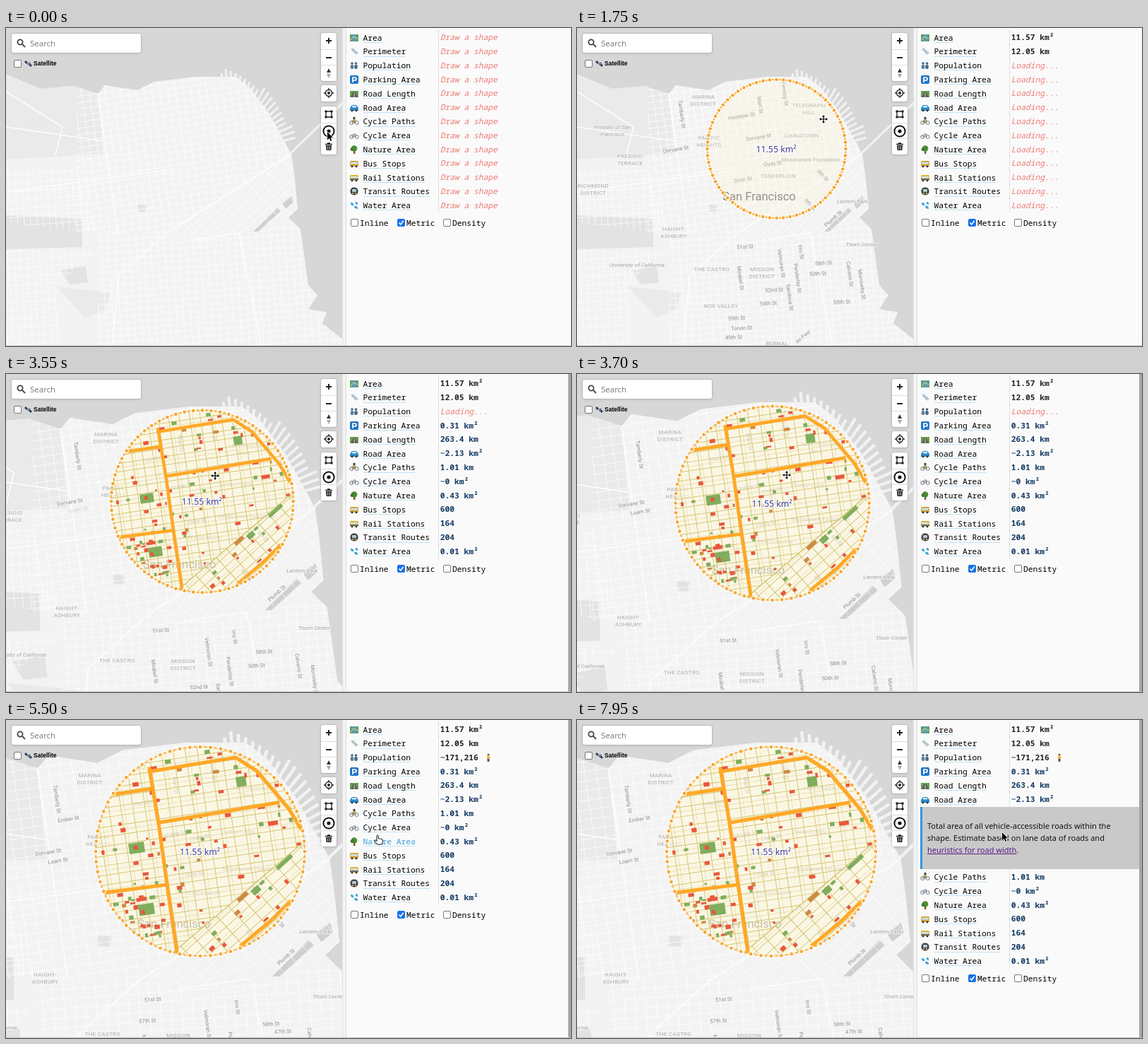
These frames come from a looping animation (800 px wide and 450 px high, 8 s). An HTML page with a canvas:

```html
<!DOCTYPE html>
<html lang="en">
<head>
<meta charset="utf-8">
<title>Area statistics</title>
<style>
html, body { margin: 0; width: 100%; height: 100%; overflow: hidden; background: #fafafa; }
#stage { position: relative; width: 800px; height: 450px; overflow: hidden; }
#map, #overlay { position: absolute; left: 0; top: 0; }
.card { position: absolute; background: #fff; border-radius: 3px; box-shadow: 0 0 0 1px rgba(0,0,0,.08), 0 1px 4px rgba(0,0,0,.14); }
#search { left: 8px; top: 8px; width: 183px; height: 27px; font: 11.5px/27px "Open Sans", sans-serif; color: #777; text-indent: 26px; }
#search svg { position: absolute; left: 7px; top: 7px; }
#sat { position: absolute; left: 11px; top: 45px; font: bold 8.5px/11px "Liberation Sans", sans-serif; color: #000; }
#sat span { position: absolute; left: 28px; }
#sat svg { position: absolute; left: 15px; top: 0; }
.box { position: absolute; width: 9px; height: 9px; border: 1px solid #777; border-radius: 2px; background: #fff; }
.box.on { background: #1a73e8; border-color: #1a73e8; }
.box svg { position: absolute; left: 0; top: 0; }
#panel { position: absolute; left: 476px; top: 0; width: 324px; height: 450px; background: #fafafa; border-left: 1px solid #e4e4e4; box-sizing: border-box; font: 500 11.28px/19.8px "Noto Sans Mono", monospace; color: #000; white-space: pre; }
#panel::before { content: ""; position: absolute; left: 0; top: 0; width: 4px; height: 450px; background: #f3f3f3; border-right: 1px solid #dcdcdc; }
#rows { position: absolute; left: 0; top: 3.7px; width: 320px; }
.row { position: relative; height: 19.8px; }
.row svg { position: absolute; left: 9px; top: 3px; }
.name { position: absolute; left: 28.5px; top: 0; height: 16.2px; border-bottom: 1px solid #c3e3f3; }
.row.hover .name { color: #3e9fe0; }
.value { position: absolute; left: 135px; top: -.5px; padding-left: 1.7px; border-left: 1px dotted #c8c8c8; font-weight: 600; color: #262626; }
.value.blue { color: #143a62; }
.value.wait { color: #ee7b75; font-style: italic; font-weight: 400; }
.value svg { left: 67px; top: 3px; }
.more { position: relative; overflow: hidden; height: 0; }
.more div { position: absolute; left: 9px; top: 1px; width: 310px; height: 87.5px; box-sizing: border-box; background: #c9c9c9; border-left: 3px solid #2f97e6; padding: 18px 0 0 7px; font: 400 11px/17px "Noto Sans", sans-serif; color: #111; }
.more u { color: #5a1c8c; }
#checks { position: relative; height: 20px; top: 5px; }
#checks .box { top: 4px; }
#checks span { position: absolute; }
#edge { position: absolute; right: 0; top: 0; width: 4px; height: 450px; background: #a6a6a6; }
#foot { position: absolute; left: 0; bottom: 0; width: 800px; height: 1px; background: #c4c4c4; }
</style>
</head>
<body>
<div id="stage">
  <canvas id="map" width="476" height="450"></canvas>
  <div id="search" class="card"><svg width="13" height="13" fill="none" stroke="#444" stroke-width="1.8"><circle cx="5" cy="5" r="3.6"/><path d="M7.7 7.7L12 12"/></svg>Search</div>
  <div id="sat"><i class="box"></i><svg width="12" height="11"><path d="M1 2l3 3M7 6l3 3" stroke="#27456b" stroke-width="3"/><path d="M4 6l3-3 2 2-3 3z" fill="#777"/></svg><span>Satellite</span></div>
  <div id="tools"></div>
  <div id="panel"><div id="rows"></div></div>
  <div id="edge"></div>
  <div id="foot"></div>
  <canvas id="overlay" width="800" height="450"></canvas>
</div>
<script>
const $ = id => document.getElementById(id);
const LOOP = 8000, FOCUS = [297.2, 141.6], ZOOM = 1.51;
const CENTER = [282.5, 171], RADIUS = 98;

// ---------- timing ----------
const ramp = (t, a, b) => Math.min(1, Math.max(0, (t - a) / (b - a)));
const ease = p => p * p * (3 - 2 * p);
const zoomAt = t => 1 + (ZOOM - 1) * (1 - (1 - ramp(t, 3200, 4250)) ** 2.37);
const radiusAt = t => RADIUS * ease(ramp(t, 850, 1400));

// start, end, x, y
const moves = [
  [50, 200, 394, 160], [350, 750, 283, 171], [850, 1400, 366, 119], [1500, 1750, 349, 129],
  [2650, 2900, 293, 148], [3200, 3700, 297, 143], [5000, 5500, 525, 163], [5850, 6200, 545, 172],
  [6450, 6750, 547, 125], [6900, 7150, 540, 107], [7300, 7700, 600, 150], [7750, 7950, 602, 159]
];
function cursorAt(t) {
  let x = 455, y = 147;
  for (const [a, b, toX, toY] of moves) {
    const p = ease(ramp(t, a, b));
    x += (toX - x) * p;
    y += (toY - y) * p;
  }
  const kind = t < 60 ? 'arrow' : t < 1450 ? 'cross' : x < 480 ? 'move' : x > 500 && x < 585 ? 'hand' : 'arrow';
  return { x, y, kind };
}

// ---------- panel ----------
const svg = (w, body) => `<svg width="${w}" height="14">${body}</svg>`;
const rect = (x, y, w, h, c, r = 0) => `<rect x="${x}" y="${y}" width="${w}" height="${h}" rx="${r}" fill="${c}"/>`;
const dot = (x, y, r, c) => `<circle cx="${x}" cy="${y}" r="${r}" fill="${c}"/>`;
const hoop = (x, y, r, c, w = 1) => `<circle cx="${x}" cy="${y}" r="${r}" fill="none" stroke="${c}" stroke-width="${w}"/>`;
const line = (d, c, w = 1) => `<path d="${d}" fill="none" stroke="${c}" stroke-width="${w}"/>`;
const shape = (d, c) => `<path d="${d}" fill="${c}"/>`;
const wheels = dot(4, 11, 1.4, '#333') + dot(10, 11, 1.4, '#333');
const bus = c => rect(1, 3, 12, 8, c, 1.5) + rect(2, 5, 10, 2.5, '#cfe6f2') + wheels;
const bike = line('M3.5 9L6 5L10 9M6 5H9L6.5 9H3.5', '#7b8c98') + hoop(3.2, 9, 2.5, '#6c7680') + hoop(10.6, 9, 2.5, '#6c7680');
const person = (x, c) => dot(x, 4, 1.8, '#48677f') + rect(x - 2.3, 6, 4.6, 6, c, 2);

const rowData = [
  ['Area', '11.57 km²', rect(1, 2, 12, 10, '#5fa06a') + rect(5, 2, 4, 10, '#5b9bc4') + line('M2 10L6 5L12 8', '#e9d9a0')],
  ['Perimeter', '12.05 km', shape('M2 4l3-2 8 7-3 3z', '#b9cbd6') + line('M4 6l1-1M6 8l1-1M8 10l1-1', '#7c8d98')],
  ['Population', '~171,216', person(4, '#5d7f98') + person(9.5, '#486c87')],
  ['Parking Area', '0.31 km²', rect(1, 1, 12, 12, '#1f76c9', 2) + line('M5 11V4H8A2 2 0 0 1 8 8H5', '#fff', 1.7)],
  ['Road Length', '263.4 km', rect(1, 3, 12, 9, '#6aa14c') + shape('M5 5h4l3 7H2z', '#56606a') + line('M7 6V12', '#f4d35e')],
  ['Road Area', '~2.13 km²', shape('M1 7l3-4h6l3 4v4H1z', '#2c8bc9') + rect(4, 4, 6, 2.5, '#cdeaf6') + wheels],
  ['Cycle Paths', '1.01 km', bike + dot(7, 2.4, 1.7, '#3a3a3a') + line('M7 4L5 7L8 9', '#b48a2c', 2)],
  ['Cycle Area', '~0 km²', bike],
  ['Nature Area', '0.43 km²', rect(6, 8, 2.4, 5, '#7c5633') + dot(7, 5.5, 4.3, '#4b8d35') + dot(4.3, 6.5, 2.6, '#3f7c2d')],
  ['Bus Stops', '600', bus('#d6a443')],
  ['Rail Stations', '164', bus('#e0b437') + line('M1 9H13', '#6d6d6d', 2)],
  ['Transit Routes', '204', rect(1.5, 1.5, 11, 11, '#444', 5) + rect(4, 4, 6, 4, '#b5c9d4', 1) + dot(5, 10, 1, '#f0d77c') + dot(9, 10, 1, '#f0d77c')],
  ['Water Area', '0.01 km²', shape('M2 3q5 0 4 4q-4 1-4-4M7 8q5-1 5 4q-5 0-5-4M9 2q4 0 3 4q-4 0-3-4', '#3ba4dc')]
];
const stories = {
  5: 'Total area of all vehicle-accessible roads within the\nshape. Estimate based on lane data of roads and\n<u>heuristics for road width</u>.',
  8: 'Total area of all natural spaces within the shape.\nIncludes parks, gardens, woods and other\ngreen areas.'
};
const rows = rowData.map(([name, value, icon], i) => {
  const el = document.createElement('div');
  el.className = 'row';
  el.innerHTML = svg(14, icon) + `<span class="name">${name}</span><span class="value"></span>`;
  $('rows').append(el);
  const row = { el, value, cell: el.lastChild };
  if (stories[i]) {
    row.more = document.createElement('div');
    row.more.className = 'more';
    row.more.innerHTML = `<div>${stories[i]}</div>`;
    $('rows').append(row.more);
  }
  return row;
});
const walker = svg(8, dot(3, 3, 1.6, '#8a5a35') + rect(1, 5, 4, 4.5, '#f0b429', 1) + rect(1.5, 9, 3, 4, '#4d5a70'));
const checkbox = (name, x, on) =>
  `<i class="box${on ? ' on' : ''}" style="left:${x}px">${on ? svg(10, line('M1.5 4.5L3.7 7L7.7 1.7', '#fff', 1.5)) : ''}</i><span style="left:${x + 13}px">${name}</span>`;
$('rows').insertAdjacentHTML('beforeend',
  `<div id="checks">${checkbox('Inline', 11)}${checkbox('Metric', 77, true)}${checkbox('Density', 142)}</div>`);

function setCell(row, text, kind) {
  const key = text + kind;
  if (row.key === key) return;
  row.key = key;
  row.cell.className = 'value ' + kind;
  row.cell.innerHTML = text;
}
function drawPanel(t, cursor) {
  const hover = cursor.kind === 'hand' ? Math.floor((cursor.y - 4) / 19.8) : -1;
  rows.forEach((row, i) => {
    const ready = i < 2 ? 1450 : i === 2 ? 5050 : 2150;
    if (t < 1450) setCell(row, 'Draw a shape', 'wait');
    else if (t < ready) setCell(row, 'Loading...', 'wait');
    else setCell(row, row.value + (i === 2 ? walker : ''), i > 2 ? 'blue' : '');
    row.el.classList.toggle('hover', i === hover);
  });
  rows[8].more.style.height = 90 * (ramp(t, 5870, 5970) - ramp(t, 6450, 6550)) + 'px';
  rows[5].more.style.height = 90 * ramp(t, 7150, 7300) + 'px';
  $('edge').style.opacity = ramp(t, 3240, 3300);
}

// ---------- map controls ----------
const glyphs = {
  plus: line('M11 7V15M7 11H15', '#222', 2),
  minus: line('M7 11H15', '#222', 2),
  north: shape('M11 4l3 6H8z', '#333') + shape('M11 18l3-6H8z', '#aaa'),
  locate: hoop(11, 11, 4.5, '#222', 1.5) + dot(11, 11, 2, '#222') + line('M11 4V7M11 15V18M4 11H7M15 11H18', '#222', 1.4),
  frame: line('M7 7H15V15H7Z', '#222', 1.3) + [7, 15].map(x => dot(x, 7, 1.8, '#222') + dot(x, 15, 1.8, '#222')).join(''),
  ring: hoop(11, 11, 7.6, '#111', 2) + dot(11, 11, 2.6, '#111'),
  trash: line('M6 7.5H16M9 6H13', '#222', 1.6) + shape('M7 9h8l-.6 7H7.6z', '#222') + line('M9.7 10V15M12.3 10V15', '#fff', .8)
};
function addTools(y, ...names) {
  const buttons = names.map((n, i) =>
    `<svg width="22" height="22" style="position:absolute;left:0;top:${i * 22.6}px;${i ? 'border-top:1px solid #ddd' : ''}">${glyphs[n]}</svg>`);
  $('tools').insertAdjacentHTML('beforeend',
    `<div class="card" style="left:446px;top:${y}px;width:22px;height:${names.length * 22.6}px">${buttons.join('')}</div>`);
}
addTools(7, 'plus', 'minus', 'north');
addTools(81, 'locate');
addTools(111, 'frame', 'ring', 'trash');

// ---------- map ----------
const g = $('map').getContext('2d');
const rad = d => d * Math.PI / 180;
function random(seed) {
  return () => {
    seed = seed + 0x6D2B79F5 | 0;
    let x = Math.imul(seed ^ seed >>> 15, 1 | seed);
    x = x + Math.imul(x ^ x >>> 7, 61 | x) ^ x;
    return ((x ^ x >>> 14) >>> 0) / 4294967296;
  };
}
const land = new Path2D('M-90 60L0 66L50 86L95 82L130 93L140 81L186 88L210 76L268 69H325L345 84L372 120L404 178L409 215L413 256L400 268L417 285L428 364L441 378L428 398L454 402L448 418L476 440V460H-90Z');
const parks = new Path2D('M-5 66L50 86L95 82L130 93L138 178L0 186ZM72 366L148 374L140 400L112 410Z');
const gardens = new Path2D('M0 265L108 270V310L0 313ZM78 343L113 337L116 360L90 363ZM186 250H199V260H186Z');
const docks = new Path2D('M350 288L384 254L389 259L357 288ZM391 248L404 237L407 247L396 256Z');
const highways = new Path2D('M404 178L225 292L160 350L150 450M0 232L236 200M130 92L158 290M262 300L330 290L362 450M0 90L80 140L70 180M0 140L138 160');
const district = (path, turn, dx, dy) => ({ path: new Path2D(path), turn, dx, dy });
const districts = [
  district('M100 60H420L405 178L225 290H100Z', -8.5, 11, 9),
  district('M405 178L440 260L300 300L225 290Z', -42, 15, 9),
  district('M130 290H225L300 300L480 260V460H130Z', -4, 10, 9),
  district('M-90 200H100L130 290L-90 266ZM-90 315H130L75 360V460H-90Z', -4, 9, 12)
];

function grid(cx, cy, turn, dx, dy, reach) {
  g.save();
  g.translate(cx, cy);
  g.rotate(rad(turn));
  g.beginPath();
  for (let d = -Math.floor(reach / dx) * dx; d <= reach; d += dx) { g.moveTo(d, -reach); g.lineTo(d, reach); }
  for (let d = -Math.floor(reach / dy) * dy; d <= reach; d += dy) { g.moveTo(-reach, d); g.lineTo(reach, d); }
  g.stroke();
  g.restore();
}
function view(k) {
  g.translate(...FOCUS);
  g.scale(k, k);
  g.translate(-FOCUS[0], -FOCUS[1]);
}
const place = (k, x, y) => [(x - FOCUS[0]) * k + FOCUS[0], (y - FOCUS[1]) * k + FOCUS[1]];

function drawPiers() {
  g.strokeStyle = '#f2f2f2';
  g.lineWidth = 3;
  g.beginPath();
  for (let i = 0; i < 20; i++) {
    const a = rad(-100 + i * 4.5), len = 74 + i * 7 % 8;
    const x = 318 + i * .8, y = 137 + i * 2;
    g.moveTo(x + Math.cos(a) * 50, y + Math.sin(a) * 50);
    g.lineTo(x + Math.cos(a) * len, y + Math.sin(a) * len);
  }
  g.moveTo(400, 180);
  g.lineTo(482, 101);
  g.stroke();
}
function drawBase(k) {
  g.fillStyle = '#d7d7d7';
  g.fillRect(0, 0, 476, 450);
  g.save();
  view(k);
  drawPiers();
  g.fillStyle = '#f3f3f3';
  g.fill(land);
  g.clip(land);
  [[parks, '#eaeaea'], [gardens, '#e3e3e3'], [docks, '#d0d0d0']].forEach(([path, c]) => {
    g.fillStyle = c;
    g.fill(path);
  });
  g.strokeStyle = 'rgba(255,255,255,.75)';
  g.lineWidth = .9 / k;
  districts.forEach(d => {
    g.save();
    g.clip(d.path);
    grid(240, 240, d.turn, d.dx, d.dy, 420);
    g.restore();
  });
  g.strokeStyle = '#fdfdfd';
  g.lineWidth = 1.6 / k;
  g.stroke(highways);
  g.restore();
}

// ---------- map labels ----------
const STREET = ['7.6px', '#8b8b8b'], AREA = ['8px', '#a9a9a9', '.3px'], PLACE = ['italic 8px', '#a2a2a2'], CITY = ['16.5px', '#707070'];
const labels = [];
function addLabels([size, color, spacing = '0px'], turn, list, from = -1, to = LOOP + 1) {
  list.split(';').forEach(item => {
    const [, text, x, y] = item.match(/(.+) (\d+),(\d+)/);
    labels.push({ size, color, spacing, turn: rad(turn), parts: text.trim().split('|'), x: +x, y: +y, from, to });
  });
}
addLabels(AREA, 0, 'MARINA|DISTRICT 179,103;TELEGRAPH|HILL 328,115;PACIFIC|HEIGHTS 187,161;CHINATOWN 318,153;PRESIDIO|TERRACE 75,187;RICHMOND|DISTRICT 23,229;TENDERLOIN 285,210;HAIGHT-|ASHBURY 137,290;THE CASTRO 191,342;MISSION|DISTRICT 262,347;NOE VALLEY 204,394;BERNAL 283,447');
addLabels(PLACE, 0, 'Presidio of San|Francisco 50,146;Meadowlark Foundation 331,187;Lantern Park 390,246;Thorn Center 403,307;University of California 85,336');
addLabels(STREET, 82, 'Tamberly St 148,122;Marl St 259,109;Fennop St 294,93;Mirabel St 231,354;Velmoran St 289,333;Irro St 317,317;Penderley St 312,354;Sandova St 301,381;Calveno St 386,348;Morrowby St 403,363');
addLabels(STREET, -9, 'Hazelow St 233,125;Dorvane St 257,155;Dorvane St 140,172;Orrin St 235,215');
addLabels(STREET, -3, '51st St 238,310;58th St 349,333;52nd St 279,371;54th St 271,390;55th St 375,388;59th St 226,411;Torvin St 233,425;49th St 222,438');
addLabels(STREET, 45, '9th St 330,250');
addLabels(STREET, -42, 'Plumb St 363,270;lm Fwy 320,437');
addLabels(STREET, -6, 'Alto St 277,176', -1, 1450);
addLabels(STREET, -6, 'Quay St 277,192', 1450);
addLabels(STREET, 45, '8th St 348,209', -1, 3900);
addLabels(STREET, -3, '50th St 341,348', -1, 3900);
addLabels(STREET, 45, '8th St 356,237', 3900);
addLabels(STREET, -9, 'Ember St 159,141;Cove St 267,91', 3900);
addLabels(STREET, -9, 'Loam St 149,180;Loam St 282,158', 3500);
addLabels(STREET, -3, '57th St 233,330;47th St 360,340', 3900);
addLabels(CITY, 0, 'San Francisco 258,239');

function drawLabels(t, k) {
  g.textAlign = 'center';
  g.textBaseline = 'middle';
  g.lineJoin = 'round';
  g.strokeStyle = 'rgba(246,246,246,.85)';
  g.lineWidth = 2;
  labels.forEach(l => {
    const alpha = ramp(t, l.from, l.from + 150) * (1 - ramp(t, l.to, l.to + 150));
    if (!alpha) return;
    g.save();
    g.globalAlpha = alpha;
    g.font = l.size + ' Roboto, sans-serif';
    g.letterSpacing = l.spacing;
    g.fillStyle = l.color;
    g.translate(...place(k, l.x, l.y));
    g.rotate(l.turn);
    l.parts.forEach((s, i) => {
      const dy = (i - (l.parts.length - 1) / 2) * 10;
      g.strokeText(s, 0, dy);
      g.fillText(s, 0, dy);
    });
    g.restore();
  });
}

// ---------- circle, its city features laid out in the close view ----------
const north = new Path2D('M80 0H460V140L200 360H80Z');
const south = new Path2D('M460 140L200 360H460Z');
const avenues = new Path2D('M203 73L325 53L355 72L400 125L418 155M203 69L216 146L228 233L242 328M217 145L385 117M148 106L207 97M141 244L228 233M333 319L375 284L403 256');
const GREEN = '#7fae5c', RED = '#e9573c', BROWN = '#cf8a45';
const blocks = [
  [185, 181, 22, 15, GREEN], [199, 268, 22, 16, GREEN], [333, 87, 14, 14, GREEN], [183, 62, 26, 11, GREEN],
  [394, 201, 28, 6, GREEN], [354, 241, 13, 9, GREEN], [378, 146, 14, 6, RED], [335, 250, 18, 6, BROWN]
];
const rnd = random(71);
for (let i = 0; i < 120; i++) {
  const dense = i < 40, a = rnd() * 2 * Math.PI, d = Math.sqrt(rnd()) * (dense ? 48 : 144);
  blocks.push([(dense ? 190 : 275) + Math.cos(a) * d, (dense ? 270 : 186) + Math.sin(a) * d,
    3 + rnd() * 6, 2.5 + rnd() * 4, i % 4 === 3 ? GREEN : i % 7 === 2 ? BROWN : RED]);
}

function drawCity(t, k) {
  const s = k / ZOOM;
  g.save();
  view(s);
  g.beginPath();
  g.arc(275, 186, 148, 0, 7);
  g.clip();
  g.globalAlpha = ramp(t, 2080, 2230);
  g.fillStyle = 'rgba(255,248,220,.45)';
  g.fillRect(100, 20, 340, 340);
  g.strokeStyle = 'rgba(206,188,92,.85)';
  [[north, -8.5, 17, 13.5], [south, -42, 22, 13]].forEach(([path, turn, dx, dy]) => {
    g.save();
    g.clip(path);
    g.lineWidth = .95 / s;
    grid(275, 186, turn, dx, dy, 240);
    g.lineWidth = .4 / s;
    grid(281, 192, turn, dx * 2, dy * 2, 240);
    g.restore();
  });
  g.lineWidth = 1.4 / s;
  g.stroke(south);
  g.globalAlpha = ramp(t, 2640, 2890);
  blocks.forEach(([x, y, w, h, c]) => {
    const isSouth = (y - 140) * 260 > (460 - x) * 220;
    g.save();
    g.translate(x, y);
    g.rotate(rad(isSouth ? -42 : -8.5));
    g.fillStyle = c;
    g.fillRect(-w / 2, -h / 2, w, h);
    g.restore();
  });
  g.globalAlpha = ramp(t, 3400, 3550);
  g.strokeStyle = '#ffa827';
  g.lineWidth = 5.2;
  g.lineJoin = g.lineCap = 'round';
  g.stroke(avenues);
  g.restore();
}
function drawCircle(t, k) {
  const r0 = radiusAt(t), r = r0 * k;
  if (r < 1) return;
  const [x, y] = place(k, ...CENTER);
  const ring = (size, color, shift = 0) => {
    g.fillStyle = color;
    for (let i = 0; i < 64; i++) {
      const a = (i + shift) / 64 * 2 * Math.PI;
      g.beginPath();
      g.arc(x + Math.cos(a) * r, y + Math.sin(a) * r, size, 0, 7);
      g.fill();
    }
  };
  const disc = new Path2D();
  disc.arc(x, y, r, 0, 7);
  g.fillStyle = 'rgba(255,240,208,.24)';
  g.fill(disc);
  if (t > 2080) drawCity(t, k);
  g.strokeStyle = 'rgba(251,176,59,.8)';
  g.lineWidth = 1;
  g.stroke(disc);
  ring(3.4, '#fff');
  ring(1.4, '#f8b24b', .5);
  ring(2.3, '#f6a62d');
  g.font = '12.3px "Noto Sans", sans-serif';
  g.strokeStyle = 'rgba(255,255,255,.9)';
  g.lineWidth = 2.5;
  g.fillStyle = '#3c3896';
  const text = (11.55 * (r0 / RADIUS) ** 2).toFixed(2) + ' km²';
  g.strokeText(text, x - .5, y + 1.5);
  g.fillText(text, x - .5, y + 1.5);
}

// ---------- cursor ----------
const o = $('overlay').getContext('2d');
const arrow = new Path2D('M0 0V11.5L2.7 9L4.5 13L6.3 12.2L4.5 8.3H8Z');
const hand = new Path2D('M0 1.2Q0 0 1.1 0T2.3 1.2V5Q3.5 4.4 4.4 5.2Q5.6 4.7 6.4 5.6Q8.3 5.2 8.3 7.2V10L7.2 13H.6L-2.8 8.6Q-3.2 7-1.7 7.2L0 8.6Z');
const cross = new Path2D('M0-5V5M-5 0H5');
const tips = new Path2D('M0-6L2-3.3H-2ZM0 6L2 3.3H-2ZM-6 0L-3.3 2V-2ZM6 0L3.3 2V-2Z');
function ink(path, color, width, fill) {
  o.strokeStyle = color;
  o.lineWidth = width;
  o.stroke(path);
  if (fill) { o.fillStyle = fill; o.fill(path); }
}
function drawCursor({ x, y, kind }) {
  o.clearRect(0, 0, 800, 450);
  o.save();
  o.translate(x, y);
  o.lineJoin = 'round';
  if (kind === 'hand') {
    o.fillStyle = '#fff';
    o.fill(hand);
    ink(hand, '#111', 1);
  } else if (kind === 'arrow') {
    ink(arrow, '#fff', 1.6, '#000');
  } else {
    ink(cross, '#fff', 3);
    if (kind === 'move') ink(tips, '#fff', 1.6, '#000');
    ink(cross, '#000', 1.2);
  }
  o.restore();
}

// ---------- loop ----------
const start = performance.now();
function frame() {
  const t = (performance.now() - start) % LOOP, k = zoomAt(t), cursor = cursorAt(t);
  drawBase(k);
  drawLabels(t, k);
  drawCircle(t, k);
  drawPanel(t, cursor);
  drawCursor(cursor);
  requestAnimationFrame(frame);
}
frame();
</script>
</body>
</html>
```
